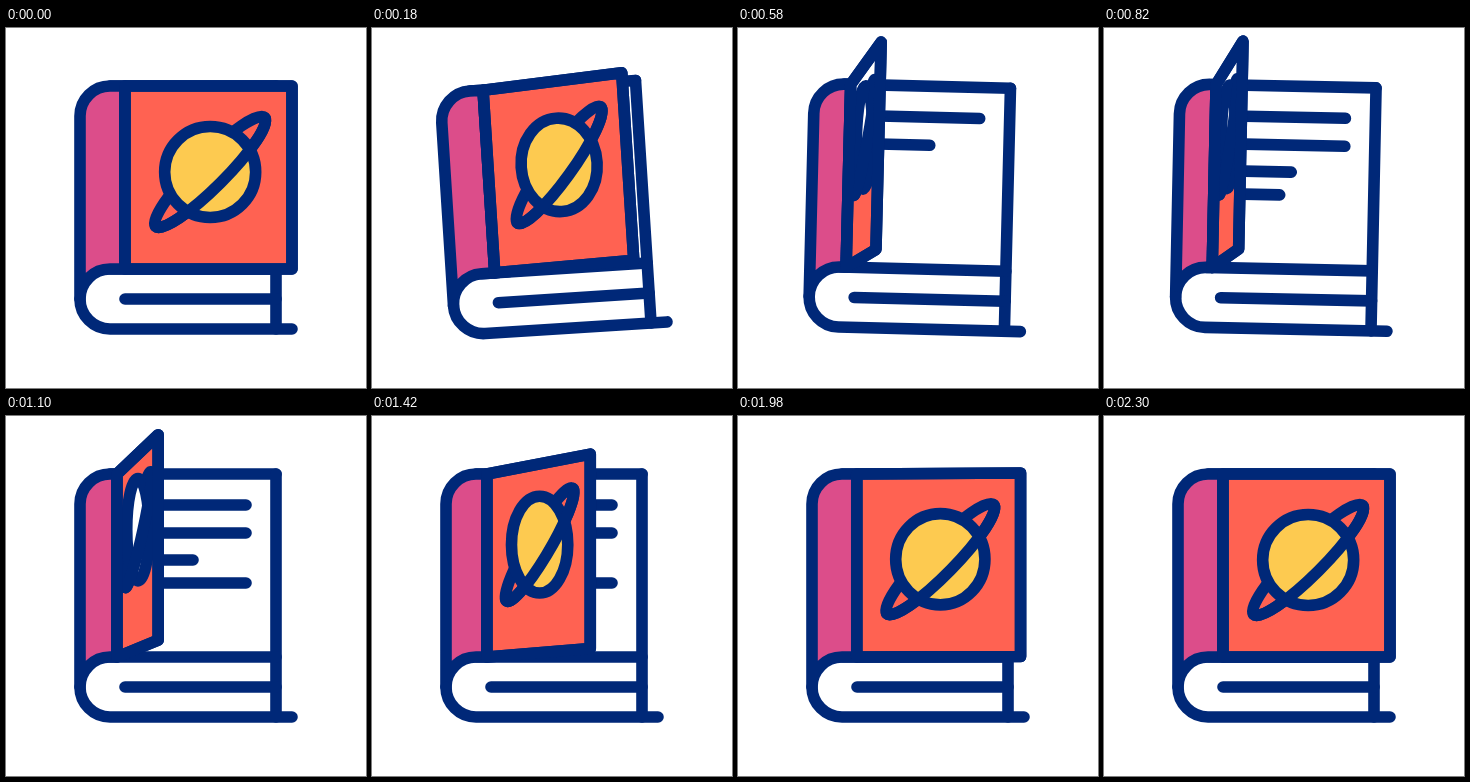
An HTML page with a canvas for the animation above (2.4 s loop, 360 by 360 pixels).

```html
<!DOCTYPE html>
<html lang="en">
<head>
<meta charset="utf-8">
<title>Book</title>
<style>
  html, body { margin: 0; width: 100%; height: 100%; overflow: hidden; background: #fff; }
  canvas { display: block; width: 360px; height: 360px; }
</style>
</head>
<body>
<canvas id="stage" width="360" height="360"></canvas>
<script>
const LOOP = 2400;
const NAVY = '#002878', PINK = '#dc4d8a', CORAL = '#ff6252', YELLOW = '#fdca50';
const PIVOT = [180, 157];
const ctx = document.getElementById('stage').getContext('2d');

// Keyframes as [ms, value]
const OPENING = [[0, 0], [640, 1], [900, 1], [1100, .893], [1420, .453], [1620, .16], [1980, .023], [2300, 0]];
const TILT = [[0, 0], [220, -4], [690, 2.3], [960, 0]];
// Text lines as [y, right end, start ms]
const LINES = [[89, 240, 340], [117, 240, 480], [144, 187, 620], [167, 240, 740]];

const clamp = x => Math.max(0, Math.min(1, x));
const smooth = x => x * x * (3 - 2 * x);

// Monotone cubic interpolation: smooth through the keys, at rest on extremes.
function track(keys, t) {
  const last = keys.length - 1;
  if (t >= keys[last][0]) return keys[last][1];
  const slope = i => i < 0 || i >= last ? 0 :
    (keys[i + 1][1] - keys[i][1]) / (keys[i + 1][0] - keys[i][0]);
  const tangent = i => {
    const a = slope(i - 1), b = slope(i);
    return a * b > 0 ? 2 * a * b / (a + b) : 0;
  };
  const i = keys.findIndex((k, n) => n < last && t < keys[n + 1][0]);
  const [t0, v0] = keys[i], [t1, v1] = keys[i + 1];
  const d = t1 - t0, p = (t - t0) / d, s = smooth(p);
  return v0 + (v1 - v0) * s
    + d * p * (1 - p) * ((1 - p) * tangent(i) - p * tangent(i + 1));
}

function paint(path, fill) {
  if (fill) {
    ctx.fillStyle = fill;
    ctx.fill(path);
  }
  ctx.stroke(path);
}

const line = (x1, y1, x2, y2) => paint(new Path2D(`M${x1} ${y1}L${x2} ${y2}`));

// Ellipse squeezed by (sx, sy) with a constant stroke weight
function oval(x, y, sx, sy, rx, ry, angle, end, fill) {
  const path = new Path2D(), shape = new Path2D();
  shape.ellipse(0, 0, rx, ry, angle, 0, end);
  path.addPath(shape, new DOMMatrix([sx, 0, 0, sy, x, y]));
  paint(path, fill);
}

function drawPages(t) {
  line(104, 58, 270, 58);
  line(270, 58, 270, 301);
  line(104, 241, 270, 241);
  line(119, 271, 270, 271);
  for (const [y, right, start] of LINES) {
    const p = smooth(clamp((t - start) / 200));
    if (p > 0) line(140, y, 140 + (right - 140) * p, y);
  }
}

function drawSpine(hinge) {
  paint(new Path2D(`M${hinge} 58H104A30 30 0 0 0 74 88V271A30 30 0 0 1 104 241H${hinge}Z`), PINK);
  paint(new Path2D('M74 271A30 30 0 0 0 104 301H286'));
}

function drawCover(open, hinge) {
  const right = 286 - 150 * open;
  const cover = new Path2D(
    `M${hinge} 58L${right} ${58 - 44 * open}V${241 - 19 * open}L${hinge} 241Z`);
  let fill = CORAL;
  if (open > .95) {
    // The upper part washes out when the cover is nearly edge-on
    fill = ctx.createLinearGradient(0, 112, 0, 114);
    fill.addColorStop(0, '#fff');
    fill.addColorStop(1, CORAL);
  }
  paint(cover, fill);

  const x = hinge + .51 * (right - hinge), y = 144 - 34 * open;
  const sx = (right - hinge) / 167, ringSy = 1 + .05 * open;
  const ring = end => oval(x, y, sx, ringSy, 77, 15, -Math.PI / 4, end);
  ring(2 * Math.PI);
  oval(x, y, sx, 1 + .14 * open, 45.5, 45.5, 0, 2 * Math.PI, open > .85 ? '#fff' : YELLOW);
  ring(Math.PI);
  ctx.stroke(cover);
}

function draw(t) {
  const open = track(OPENING, t), hinge = 119 - 9 * open;
  const [px, py] = PIVOT;
  ctx.setTransform(1, 0, 0, 1, 0, 0);
  ctx.fillStyle = '#fff';
  ctx.fillRect(0, 0, 360, 360);
  ctx.translate(px, py);
  ctx.rotate(track(TILT, t) * Math.PI / 180);
  ctx.translate(-px, -py);
  ctx.strokeStyle = NAVY;
  ctx.lineWidth = 11.6;
  ctx.lineCap = ctx.lineJoin = 'round';
  drawPages(t);
  drawSpine(hinge);
  drawCover(open, hinge);
}

function tick() {
  draw(performance.now() % LOOP);
  requestAnimationFrame(tick);
}
tick();
</script>
</body>
</html>
```
